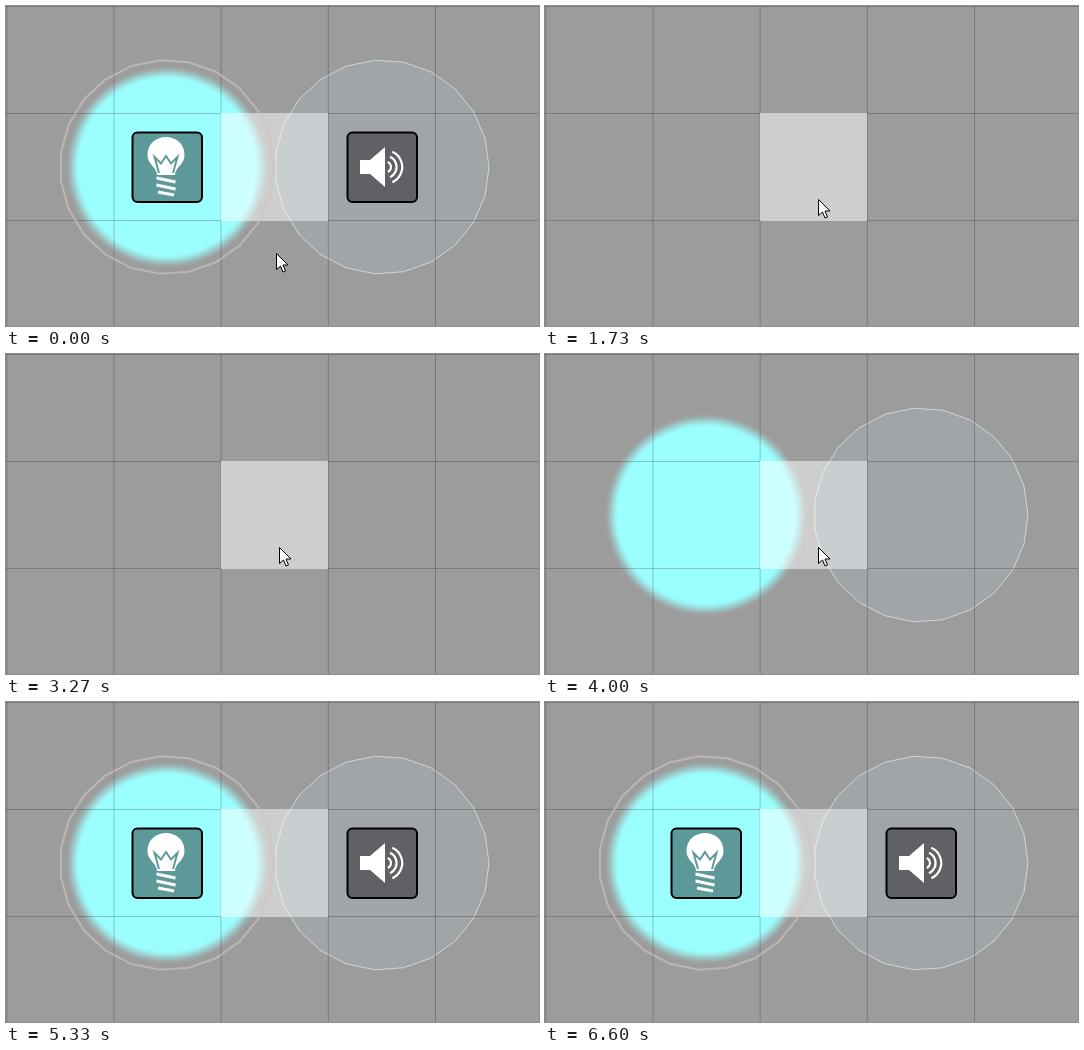
Write an HTML page with a canvas that moves like this. It is 533 px wide and 320 px high and loops after 7.14 s.

```html
<!DOCTYPE html>
<html lang="en">
<head>
<meta charset="utf-8">
<title>Light and sound toggle</title>
<style>
  html, body { margin: 0; width: 100%; height: 100%; overflow: hidden; background: #9c9c9c; }
  canvas { display: block; }
</style>
</head>
<body>
<canvas id="stage" width="533" height="320"></canvas>
<script>
const ctx = document.getElementById('stage').getContext('2d');
const W = 533, H = 320, LOOP = 7140, TICK = 1000 / 15;
const CELL = 107.17, RADIUS = 107, SIDES = 23, BADGE = 69.5;
const LIGHT = { x: 161, y: 161 }, SOUND = { x: 376, y: 161 };
const TILE = [215, 107, 107, 108];

const between = (t, a, b) => t >= a && t < b;
const smooth = u => u * u * (3 - 2 * u);
const mix = (a, b, u) => a + (b - a) * u;

function trace(points, closed) {
  ctx.beginPath();
  points.forEach(([x, y]) => ctx.lineTo(x, y));
  if (closed) ctx.closePath();
}

function stroke(color, width) {
  ctx.strokeStyle = color;
  ctx.lineWidth = width;
  ctx.stroke();
}

function ring(c) {
  trace(Array.from({ length: SIDES }, (_, i) => {
    const a = i * 2 * Math.PI / SIDES;
    return [c.x + RADIUS * Math.cos(a), c.y + RADIUS * Math.sin(a)];
  }), true);
}

function drawFloor() {
  ctx.fillStyle = '#9c9c9c';
  ctx.fillRect(0, 0, W, H);
  ctx.fillStyle = '#cecece';
  ctx.fillRect(...TILE);
}

// Grid lines stay hidden under the bright tile
function drawGrid() {
  ctx.save();
  ctx.beginPath();
  ctx.rect(0, 0, W, H);
  ctx.rect(...TILE);
  ctx.clip('evenodd');
  ctx.fillStyle = 'rgba(0,0,0,.22)';
  for (let i = 0; i < 5; i++) ctx.fillRect(.3 + i * CELL, 0, 1, H);
  for (let i = 0; i < 3; i++) ctx.fillRect(0, Math.round(i * CELL), W, 1);
  ctx.restore();
}

function drawGlow() {
  const inner = 87, outer = 102;
  const g = ctx.createRadialGradient(LIGHT.x, LIGHT.y, inner, LIGHT.x, LIGHT.y, outer);
  for (let u = 0; u <= 1; u += .125) g.addColorStop(u, `rgba(0,255,255,${1 - smooth(u)})`);
  ctx.save();
  ctx.globalCompositeOperation = 'screen';
  ctx.fillStyle = g;
  ctx.fillRect(LIGHT.x - outer, LIGHT.y - outer, outer * 2, outer * 2);
  ctx.restore();
}

function drawSoundArea() {
  ring(SOUND);
  ctx.fillStyle = 'rgba(176,206,220,.18)';
  ctx.fill();
  stroke('rgba(255,255,255,.55)', 1);
}

function drawBadge(c, color) {
  ctx.beginPath();
  ctx.roundRect(c.x - 34.5, c.y - 34.5, BADGE, BADGE, 5);
  ctx.fillStyle = color;
  ctx.fill();
  stroke('#000', 2);
}

function drawBulb() {
  const color = '#5d9999';
  drawBadge(LIGHT, color);
  ctx.save();
  ctx.translate(160, 150);
  ctx.fillStyle = '#fff';
  ctx.beginPath();
  ctx.moveTo(-9, 19);
  ctx.bezierCurveTo(-9, 11, -18.5, 9, -18.5, -1);
  ctx.bezierCurveTo(-18.5, -25, 18.5, -25, 18.5, -1);
  ctx.bezierCurveTo(18.5, 9, 9, 11, 9, 19);
  ctx.fill();
  for (const y of [23, 30]) {
    trace([[-9.5, y - 1], [9.5, y + 3]]);
    stroke('#fff', 3);
  }
  trace([[-8, 36], [8, 39]]);
  stroke('#fff', 3);
  trace([[-7, 17], [-11.5, 1], [-5, 7.5], [0, 0], [5, 7.5], [11.5, 1], [7, 17]]);
  stroke(color, 2);
  ctx.restore();
}

function drawSpeaker() {
  drawBadge(SOUND, '#5f6165');
  ctx.fillStyle = '#fff';
  trace([[354, 154], [364, 154], [379, 141], [379, 181], [364, 168], [354, 168]], true);
  ctx.fill();
  for (let i = 0; i < 3; i++) {
    ctx.beginPath();
    ctx.arc(379.5, 161, 5.5 + 5.6 * i, -1.15, 1.15);
    stroke('#fff', 2.2);
  }
}

// Each move: start, end, then start point, control point and end point of a curve
const MOVES = [
  [0, TICK, [270, 247], [266, 266], [261, 285]],
  [7 * TICK, 15 * TICK, [261, 285], [262, 240], [273, 193]],
  [60 * TICK, 69 * TICK, [273, 193], [272, 215], [250, 251]],
  [82 * TICK, 92 * TICK, [321, 207], [202, 45], [83, 171]],
  [92 * TICK, 98 * TICK, [83, 171], [100, 220], [179, 300]]
];

function pointerAt(t) {
  const now = Math.floor((t + 4) / TICK) * TICK;
  if (between(t, 4670, 5470) || t >= 6600) return null;
  const [start, end, a, b, c] = MOVES.filter(m => m[0] <= now + 1).pop();
  const u = smooth(Math.min(1, Math.max(0, (now - start) / (end - start))));
  return a.map((v, i) => Math.round(mix(mix(v, b[i], u), mix(b[i], c[i], u), u)));
}

function drawPointer([x, y]) {
  ctx.save();
  ctx.translate(x + .5, y + .5);
  trace([[0, 0], [0, 16], [4, 12.5], [6.5, 18.5], [9, 17.5], [6.5, 11.5], [11.5, 11.5]], true);
  ctx.fillStyle = '#fff';
  ctx.fill();
  stroke('#000', 1);
  ctx.restore();
}

function areaAlpha(t) {
  if (between(t, 1730, 2400) || between(t, 3270, 4000)) return 0;
  return between(t, 2400, 2470) ? .5 : 1;
}

function render(t) {
  drawFloor();
  ctx.globalAlpha = areaAlpha(t);
  drawGlow();
  drawSoundArea();
  ctx.globalAlpha = 1;
  drawGrid();
  if (!between(t, 1730, 5330)) {
    ring(LIGHT);
    stroke('rgba(205,195,195,.65)', 2);
    drawBulb();
    drawSpeaker();
  }
  const pointer = pointerAt(t);
  if (pointer) drawPointer(pointer);
}

const start = performance.now();
function loop() {
  render((performance.now() - start) % LOOP);
  requestAnimationFrame(loop);
}
loop();
</script>
</body>
</html>
```
